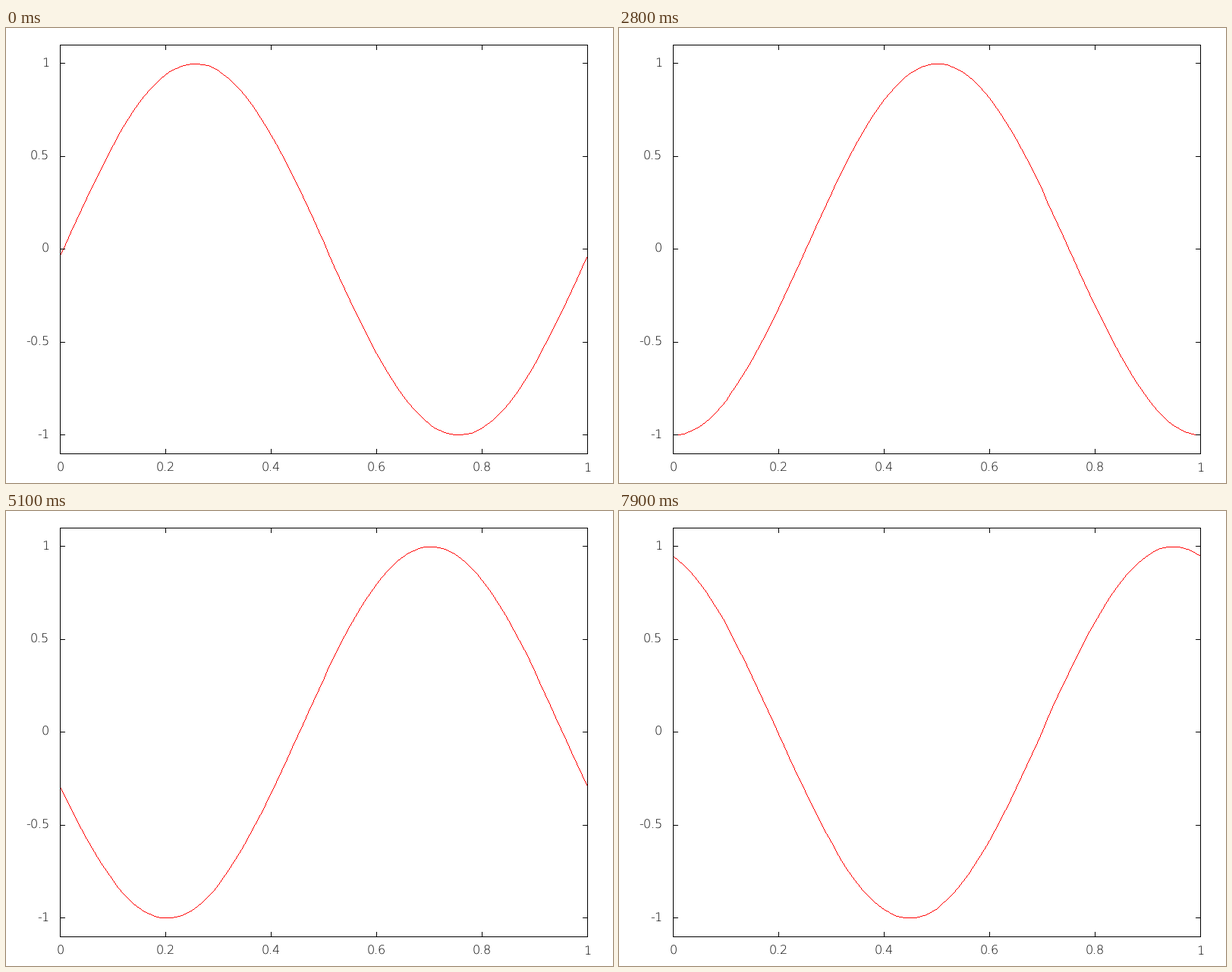
A matplotlib script that plays this animation: 800x600 px, repeating every 8000 ms.

```python
import numpy as np
import matplotlib.pyplot as plt
from matplotlib.animation import FuncAnimation
from matplotlib.collections import PolyCollection

W, H, DPI = 800, 600, 100
LEFT, RIGHT, TOP, BOTTOM = 71, 766, 22, 561
Y_MAX = 1.1
TICK = 6
FRAMES, INTERVAL = 80, 100
START, STEP = 0.0055, 1 / 114  # phase in wavelengths

plt.rcParams.update({
    "font.family": "DejaVu Sans",
    "font.weight": "ultralight",
    "font.size": 16 * 72 / DPI,
    "text.hinting": "native",
    "text.hinting_factor": 1,
})


def nearest(v):
    return np.floor(np.asarray(v) + 0.5).astype(int)


def px(x):
    return LEFT + nearest((RIGHT - LEFT) * np.asarray(x))


def py(y):
    scale = (BOTTOM - TOP) / (2 * Y_MAX)
    return BOTTOM - nearest(scale * (np.asarray(y) + Y_MAX))


def boxes(x0, y0, x1, y1):
    """Corners of the boxes covering whole pixels x0..x1, y0..y1."""
    x1, y1 = x1 + 1, y1 + 1
    corners = [(x0, y0), (x1, y0), (x1, y1), (x0, y1)]
    return np.array(corners, float).transpose(2, 0, 1)


def trace(xs, ys):
    """Whole pixels along a polyline, one per step of its longer side."""
    cols, rows = [xs[:1]], [ys[:1]]
    for x0, y0, x1, y1 in zip(xs, ys, xs[1:], ys[1:]):
        n = max(abs(x1 - x0), abs(y1 - y0))
        t = np.arange(1, n + 1) / n
        cols.append(nearest(x0 + (x1 - x0) * t))
        rows.append(nearest(y0 + (y1 - y0) * t))
    return np.concatenate(cols), np.concatenate(rows)


fig = plt.figure(figsize=(W / DPI, H / DPI), dpi=DPI, facecolor="white")
ax = fig.add_axes([0, 0, 1, 1])
ax.set_xlim(0, W)
ax.set_ylim(H, 0)
ax.axis("off")

style = dict(linewidths=0, edgecolors="none", antialiaseds=False)
curve = PolyCollection([], facecolors="red", zorder=2, **style)
ax.add_collection(curve, autolim=False)

# Border, mirrored ticks and labels
bars = [
    (LEFT, TOP, RIGHT, TOP), (LEFT, BOTTOM, RIGHT, BOTTOM),
    (LEFT, TOP, LEFT, BOTTOM), (RIGHT, TOP, RIGHT, BOTTOM),
]
for v in (0, 0.2, 0.4, 0.6, 0.8, 1):
    x = int(px(v))
    bars += [(x, TOP, x, TOP + TICK), (x, BOTTOM - TICK, x, BOTTOM)]
    ax.text(x + 0.5, 585, f"{v:g}", ha="center", va="baseline")
for v in (-1, -0.5, 0, 0.5, 1):
    y = int(py(v))
    bars += [(LEFT, y, LEFT + TICK, y), (RIGHT - TICK, y, RIGHT, y)]
    ax.text(57, y + 5, f"{v:g}", ha="right", va="baseline")
frame = PolyCollection(boxes(*np.array(bars).T), facecolors="black",
                       zorder=3, **style)
ax.add_collection(frame, autolim=False)

grid = np.linspace(0, 1, 101)


def update(i):
    wave = 0.9999 * np.sin(2 * np.pi * (grid - START - STEP * i))
    cols, rows = trace(px(grid), py(wave))
    curve.set_verts(boxes(cols, rows, cols, rows))
    return curve,


anim = FuncAnimation(fig, update, frames=FRAMES, interval=INTERVAL,
                     repeat=True, repeat_delay=0, blit=False)
plt.show()
```
